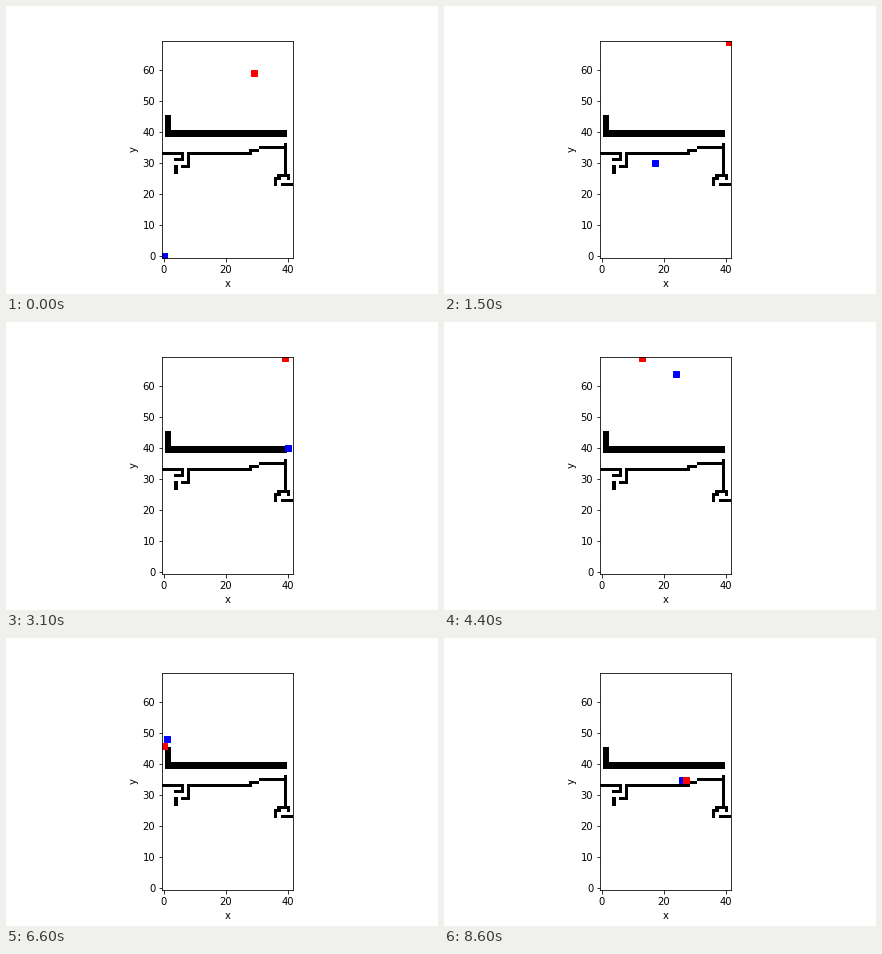
Write a matplotlib script that moves like this. It is 432x288 px and loops after 8650 ms.

```python
import numpy as np
import matplotlib.pyplot as plt
from matplotlib.animation import FuncAnimation

W, H = 42, 70
STEPS = 173

# Walls as strokes through grid cells
STROKES = [
    [(1, 45), (1, 39), (39, 39), (39, 40), (2, 40), (2, 45)],
    [(0, 33), (6, 33), (6, 31), (4, 31)],
    [(4, 29), (4, 27)],
    [(6, 29), (8, 29), (8, 33), (28, 33), (28, 34), (30, 34), (31, 35),
     (39, 35), (39, 36), (39, 26)],
    [(40, 25), (40, 26), (37, 26), (37, 25), (36, 25), (36, 23)],
    [(38, 23), (41, 23)],
]

# Turning points of the chaser: step, x, y
TURNS = [
    (0, 0, 0), (18, 7, 18), (30, 17, 30), (47, 31, 33), (49, 30, 36),
    (61, 40, 39), (72, 37, 50), (88, 24, 64), (105, 7, 65), (110, 2, 69),
    (131, 2, 49), (133, 0, 47), (146, 0, 36), (148, 2, 34), (172, 26, 35),
]

# Earlier moves win ties
MOVES = [(-1, 0), (0, 1), (1, 0), (0, -1)]


def nearest(values):
    return np.floor(np.asarray(values) + 0.5).astype(int)


def build_walls():
    grid = np.zeros((H, W))
    for stroke in STROKES:
        for (x0, y0), (x1, y1) in zip(stroke, stroke[1:]):
            n = max(abs(x1 - x0), abs(y1 - y0)) + 1
            ys, xs = np.linspace(y0, y1, n), np.linspace(x0, x1, n)
            grid[nearest(ys), nearest(xs)] = 1
    return grid


def chase():
    t, x, y = np.array(TURNS).T
    k = np.arange(STEPS)
    return nearest(np.column_stack([np.interp(k, t, x), np.interp(k, t, y)]))


def flee(grid, chaser, start):
    """Always step to the free neighbour farthest from the chaser."""
    path = [start]
    for cx, cy in chaser[:-1]:
        x, y = path[-1]
        options = [(x + dx, y + dy) for dx, dy in MOVES]
        free = [(a, b) for a, b in options
                if 0 <= a < W and 0 <= b < H and not grid[b, a]]
        path.append(max(free, key=lambda p: (p[0] - cx)**2 + (p[1] - cy)**2))
    return np.array(path)


walls = build_walls()
chaser = chase()
runner = flee(walls, chaser, (29, 59))

plt.rcParams["font.family"] = "DejaVu Sans"
plt.rcParams["text.kerning_factor"] = 6
fig, ax = plt.subplots(figsize=(6, 4), dpi=72)
fig.subplots_adjust(left=0.125, right=0.9, bottom=0.125, top=0.88)
ax.imshow(walls, cmap="Greys", origin="lower", interpolation="nearest")
ax.set_xticks(range(0, W, 20))
ax.set_yticks(range(0, H, 10))
ax.set_xlabel("x")
ax.set_ylabel("y")
ax.set_xlim(-0.5, W - 0.5)
ax.set_ylim(-0.5, H - 0.5)

blue, = ax.plot([], [], "s", color="blue", markersize=6)
red, = ax.plot([], [], "s", color="red", markersize=6)


def update(i):
    for dot, path in ((blue, chaser), (red, runner)):
        dot.set_data([path[i, 0]], [path[i, 1]])
    return blue, red


anim = FuncAnimation(fig, update, frames=STEPS, interval=50,
                     repeat=True, repeat_delay=0, blit=False)
plt.show()
```
